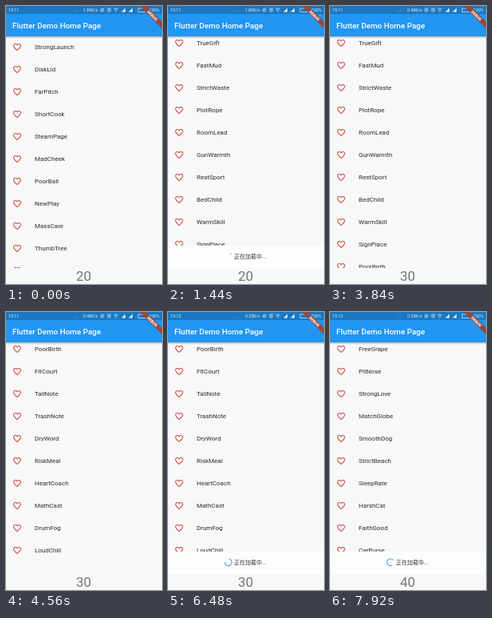
These frames come from a looping animation (196 px wide and 348 px high, 8 s). An HTML page:

```html
<!DOCTYPE html>
<html lang="en">
<head>
<meta charset="utf-8">
<style>
  html, body { margin: 0; width: 100%; height: 100%; overflow: hidden; background: #f8f8f8; }
  svg { display: block; width: 100vw; height: 100vh; font-family: Roboto, sans-serif; }
  .row { font-size: 8px; fill: #2b2b2b; }
  .status { font-size: 5.3px; fill: #e4f0fb; }
</style>
</head>
<body>
<svg viewBox="0 0 196 348">
  <defs>
    <clipPath id="viewport"><rect y="38" width="196" height="290"/></clipPath>
    <linearGradient id="shade" x2="0" y2="1">
      <stop stop-color="#000" stop-opacity=".26"/>
      <stop offset="1" stop-color="#000" stop-opacity="0"/>
    </linearGradient>
    <path id="heart" transform="scale(.5)" d="M16.5 3c-1.74 0-3.41.81-4.5 2.09C10.91 3.81 9.24 3 7.5 3 4.42 3 2 5.42 2 8.5c0 3.78 3.4 6.86 8.55 11.54L12 21.35l1.45-1.32C18.6 15.36 22 12.28 22 8.5 22 5.42 19.58 3 16.5 3zm-4.4 15.55l-.1.1-.1-.1C7.14 14.24 4 11.39 4 8.5 4 6.5 5.5 5 7.5 5c1.54 0 3.04.99 3.57 2.36h1.87C13.46 5.99 14.96 5 16.5 5c2 0 3.5 1.5 3.5 3.5 0 2.89-3.14 5.74-7.9 10.05z"/>
  </defs>
  <rect width="196" height="348" fill="#f8f8f8"/>

  <g clip-path="url(#viewport)">
    <g id="list"></g>
    <g id="loader">
      <rect y="300" width="196" height="28" fill="#fcfdfd"/>
      <path id="spinner" fill="none" stroke="#3f9ff0" stroke-width="1.1"/>
      <text x="83" y="315.7" font-size="7" fill="#333" font-family="Noto Sans CJK SC, Noto Sans CJK, sans-serif">正在加载中...</text>
    </g>
  </g>
  <text id="count" x="97.5" y="344" font-size="17" fill="#757575" text-anchor="middle"></text>

  <rect y="38" width="196" height="3" fill="url(#shade)"/>
  <rect width="196" height="38" fill="#2196f3"/>
  <rect width="196" height="10" fill="#1a78c2"/>
  <text x="8" y="27.6" font-size="9.9" font-weight="500" fill="#fff">Flutter Demo Home Page</text>

  <text id="clock" class="status" x="3" y="7"></text>
  <text class="status" x="85" y="7">...</text>
  <text id="speed" class="status" x="115.5" y="7" text-anchor="end"></text>
  <g fill="none" stroke="#e4f0fb" stroke-width=".7">
    <circle cx="121" cy="5" r="2"/><path d="M119.6 6.4l2.8-2.8"/>
    <circle cx="129.5" cy="5.2" r="2"/><path d="M129.5 4v1.3h1M127 3l1.2-1M132 3l-1.2-1"/>
    <path d="M135.2 4q2.8-2.4 5.6 0M136.4 5.4q1.6-1.3 3.2 0"/>
    <rect x="166" y="3" width="11" height="4.4"/>
  </g>
  <path fill="#e4f0fb" d="M138 7.8l-1-1.2h2zM145 7.5h5v-5zM154 7.5h5v-5z"/>
  <text class="status" x="180" y="7">100%</text>

  <g transform="translate(196 0) rotate(45)">
    <rect x="-20" y="14" width="40" height="6" fill="#954a40"/>
    <text y="18.8" font-size="5" font-weight="900" fill="#fff" text-anchor="middle">DEBUG</text>
  </g>
</svg>
<script>
const LOOP = 8000, ROW = 28;
const names = `StrongLaunch DiskLid FarPitch ShortCook SteamPage MadCheek PoorBall NewPlay MassCare ThumbTree
  TrueGift FastMud StrictWaste PlotRope RoomLead GunWarmth RestSport BedChild WarmSkill SignPlace
  PoorBirth FitCourt TallNote TrashNote DryWord RiskMeal HeartCoach MathCast DrumFog LoudChill
  FreeGrape PitNose StrongLove MatchGlobe SmoothDog StrictBeach SleepRate HarshCat FaithGood CarPurse`.split(/\s+/);

// [start, end, distance] of each swipe; [start, end] of each page load
const swipes = [[130, 1300, 285], [3860, 4520, 280], [7080, 7440, 280]];
const loads = [[1350, 3400], [5000, 6960], [7440, 9440]];

const $ = id => document.getElementById(id);
const clamp = v => Math.min(1, Math.max(0, v));
const smooth = u => u * u * (3 - 2 * u);

$('list').innerHTML = names.map((name, i) => `<g id="row${i}" transform="translate(0 ${38 + i * ROW})">
  <use href="#heart" x="8" y="7.5" fill="#cb453b"/><text class="row" x="36" y="16.4">${name}</text></g>`).join('');
const rows = names.map((_, i) => $('row' + i));

// Cubic easing (.4, 0, .2, 1), solved for x by bisection
function fastOutSlowIn(x) {
  let lo = 0, hi = 1;
  for (let i = 0; i < 20; i++) {
    const s = (lo + hi) / 2, r = 1 - s;
    if (1.2 * r * r * s + .6 * r * s * s + s ** 3 < x) lo = s; else hi = s;
  }
  return lo * lo * (3 - 2 * lo);
}

function spinnerArc(elapsed) {
  const step = Math.floor(elapsed / 1000), phase = elapsed / 1000 - step;
  const head = fastOutSlowIn(clamp(phase * 2)), tail = fastOutSlowIn(clamp(phase * 2 - 1));
  const from = Math.PI * (-.5 + 1.5 * tail + 1.7 * phase - .8 * step);
  const sweep = Math.max(.12, 1.5 * Math.PI * (head - tail));
  const point = a => `${75.8 + 4.3 * Math.cos(a)} ${313.3 + 4.3 * Math.sin(a)}`;
  return `M${point(from)}A4.3 4.3 0 ${+(sweep > Math.PI)} 1 ${point(from + sweep)}`;
}

function draw(t) {
  const scroll = swipes.reduce((sum, [a, b, d]) => sum + d * smooth(clamp((t - a) / (b - a))), 0);
  const count = 20 + 10 * loads.filter(([, end]) => t >= end).length;
  const load = loads.find(([a, b]) => t >= a && t < b);

  $('list').setAttribute('transform', `translate(0 ${-scroll})`);
  rows.forEach((row, i) => row.style.display = i < count ? '' : 'none');
  $('loader').style.display = load ? '' : 'none';
  if (load) $('spinner').setAttribute('d', spinnerArc(t - load[0]));
  $('count').textContent = count;
  $('clock').textContent = t < 5280 ? '15:11' : '15:12';
  $('speed').textContent = (t < 2600 ? '1.89' : t < 5600 ? '0.48' : '0.25') + 'K/s';
}

const began = performance.now();
function tick() {
  draw((performance.now() - began) % LOOP);
  requestAnimationFrame(tick);
}
tick();
</script>
</body>
</html>
```
